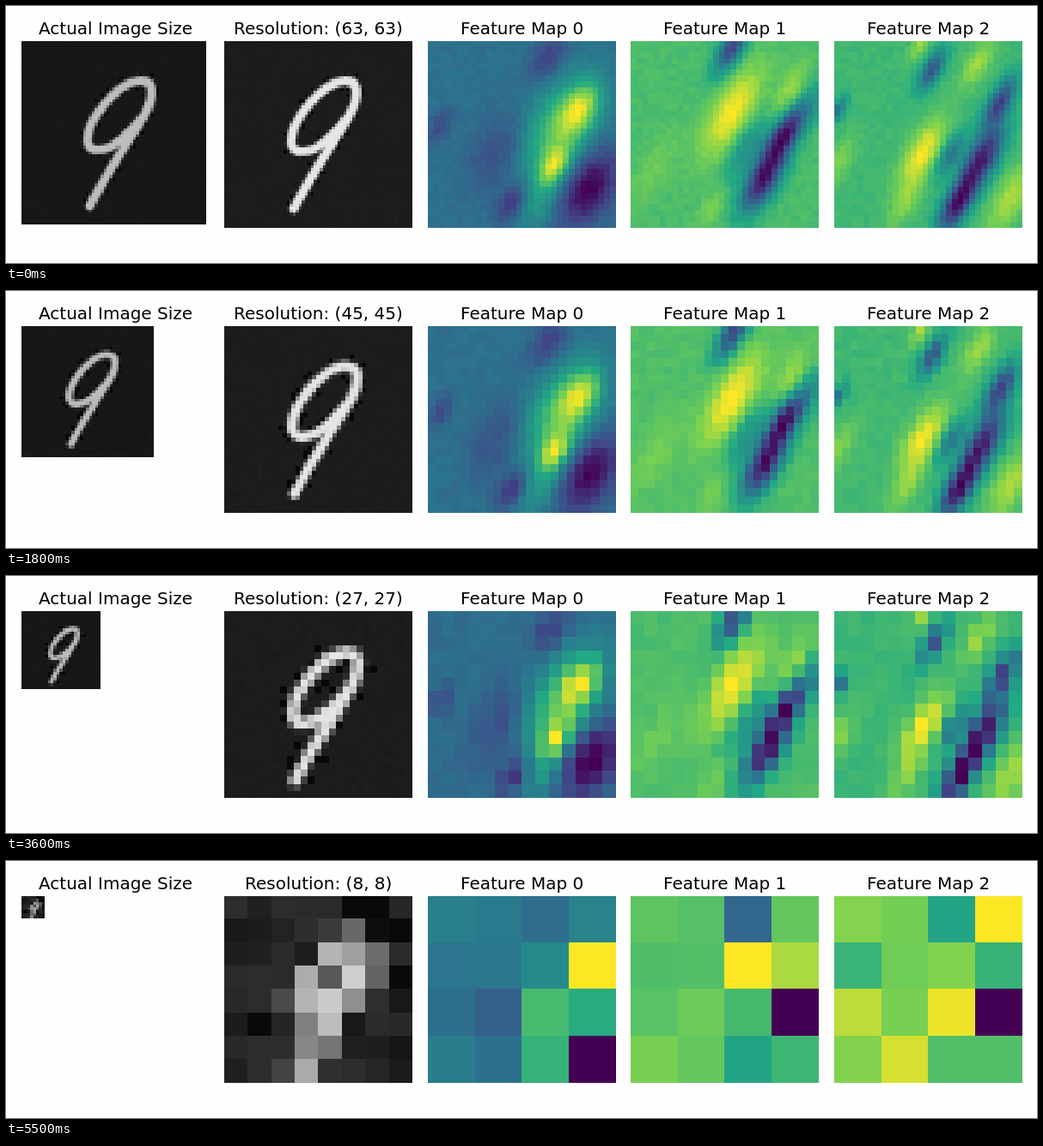
These frames come from a looping animation (1200x300 px, 5.6 s). An HTML page with a canvas:

```html
<!DOCTYPE html>
<html>
<head>
<meta charset="utf-8">
<style>
html, body { margin: 0; width: 100%; height: 100%; overflow: hidden; background: #fefefe; }
canvas { display: block; }
</style>
</head>
<body>
<canvas id="stage" width="1200" height="300"></canvas>
<script>
const SIDE = 219, TOP = 41, FRAME_MS = 100, MAX_N = 63, FRAMES = 56;
const stage = document.getElementById('stage').getContext('2d');
const tile = document.createElement('canvas');
const pen = tile.getContext('2d', { willReadFrequently: true });
const nine = new Path2D('M147 86C158 64 158 46 139 47C112 50 78 95 78 118C78 134 100 136 122 114' +
  'C132 104 142 95 147 86C132 112 105 150 81 197');

const VIRIDIS = ['440154', '414487', '2a788e', '22a884', '7ad151', 'fde725']
  .map(h => [0, 2, 4].map(i => parseInt(h.slice(i, i + 2), 16)));

// All hills lean along the digit's stem; each one is x, y, height, size
const LEAN = -Math.PI / 3;
const MAPS = [
  { base: .33, stretch: 1.3, hills: [
    [177, 80, .4, 17], [152, 105, .38, 34], [147, 147, .45, 13], [130, 190, .15, 18],
    [188, 172, -.4, 25], [97, 190, -.25, 13], [140, 20, -.2, 16], [85, 130, -.14, 28], [14, 100, -.15, 11]] },
  { base: .72, stretch: 1.6, hills: [
    [118, 85, .3, 25], [185, 60, .15, 16], [118, 8, -.48, 15], [178, 110, -.5, 15],
    [155, 162, -.62, 19], [135, 125, -.2, 20], [203, 85, -.2, 18], [95, 195, .1, 13], [28, 150, .07, 22]] },
  { base: .66, stretch: 1.6, hills: [
    [102, 132, .34, 19], [167, 27, .2, 14], [114, 34, -.42, 12], [100, 3, .2, 9],
    [193, 72, -.5, 14], [172, 138, -.6, 19], [143, 192, -.62, 16], [135, 133, -.3, 12],
    [205, 185, .22, 20], [4, 82, -.3, 8], [5, 142, .15, 14], [82, 190, .15, 14]] }
];

const clamp = (v, lo, hi) => Math.min(hi, Math.max(lo, v));
const panelX = k => Math.round(17.8 + 236.5 * k);

function noise(i, j, n) {
  const s = Math.sin(i * 12.9898 + j * 78.233 + n * 37.719) * 43758.5453;
  return s - Math.floor(s);
}

function viridis(v) {
  const last = VIRIDIS.length - 1, p = clamp(v, 0, 1) * last, k = Math.min(last - 1, Math.floor(p));
  return VIRIDIS[k].map((c, i) => c + (VIRIDIS[k + 1][i] - c) * (p - k));
}

// Fill the tile with m x m pixels
function paint(m, colour) {
  tile.width = tile.height = m;
  const img = pen.createImageData(m, m);
  for (let j = 0; j < m; j++)
    for (let i = 0; i < m; i++) img.data.set([...colour(i, j), 255], (j * m + i) * 4);
  pen.putImageData(img, 0, 0);
}

function placeTile(k) {
  stage.save();
  stage.beginPath();
  stage.rect(panelX(k), TOP, SIDE, SIDE - 1);
  stage.clip();
  stage.drawImage(tile, panelX(k) - .1, TOP - .9, SIDE, SIDE - .4);
  stage.restore();
}

function title(text, k) {
  const w = stage.measureText(text).width;
  stage.fillText(text, Math.round(127.4 + 236.5 * k - w / 2), 33);
}

function height({ base, stretch, hills }, x, y) {
  const c = Math.cos(LEAN), s = Math.sin(LEAN);
  return hills.reduce((sum, [hx, hy, h, size]) => {
    const dx = (x - hx) / size, dy = (y - hy) / size;
    const u = (dx * c + dy * s) / stretch, v = (dy * c - dx * s) * stretch;
    return sum + h * Math.exp(-(u * u + v * v) / 2);
  }, base);
}

function drawMap(map, k, n) {
  const m = (n + 1) >> 1, cell = SIDE / m;
  const shift = SIDE / n - SIDE / MAX_N; // coarse pixels drift right and down
  const values = Array.from({ length: m * m }, (_, q) => {
    const i = q % m, j = Math.floor(q / m);
    return height(map, (i + .5) * cell - shift * .5, (j + .5) * cell - shift * .75) + .04 * (noise(i, j, n) - .5);
  });
  const min = Math.min(...values), max = Math.max(...values);
  paint(m, (i, j) => viridis((values[j * m + i] - min) / (max - min)));
  placeTile(k);
}

function strokeNine(width, alpha) {
  pen.lineWidth = width;
  pen.strokeStyle = `rgba(255,255,255,${alpha})`;
  pen.stroke(nine);
}

function drawDigit(n) {
  const px = SIDE / n, drift = .4 * (1 - n / MAX_N), width = 9 + .5 * px;
  const toDigit = () => pen.setTransform(1 / px, 0, 0, 1 / px, drift, drift);
  const back = 28 + 27 * Math.exp(-(((n - 14) / 5) ** 2));
  const grain = 1.5 + 12 * clamp((24 - n) / 8, 0, 1);

  // Dark specks ring the stroke
  tile.width = tile.height = n;
  toDigit();
  pen.lineWidth = width + 3 * px;
  const near = Array.from({ length: n * n }, (_, q) =>
    pen.isPointInStroke(nine, q % n + .5, Math.floor(q / n) + .5));
  paint(n, (i, j) => {
    const r = noise(i, j, n);
    const g = near[j * n + i] && r < .25 ? back * .25 : back + grain * (2 * r - 1);
    return [g, g, g];
  });

  toDigit();
  pen.lineCap = pen.lineJoin = 'round';
  strokeNine(width + .5 * px, .25);
  strokeNine(width - 1, .85);
  placeTile(1);

  const w = Math.round(n * 3.42);
  stage.drawImage(tile, panelX(0), TOP, w, w - 1);
  stage.fillStyle = 'rgba(0,0,0,.18)';
  stage.fillRect(panelX(0), TOP, w, w - 1);
}

function draw(n) {
  stage.fillStyle = '#fefefe';
  stage.fillRect(0, 0, 1200, 300);
  stage.imageSmoothingEnabled = false;
  drawDigit(n);
  MAPS.forEach((map, k) => drawMap(map, k + 2, n));
  stage.fillStyle = '#000';
  stage.font = '20px "DejaVu Sans", sans-serif';
  title('Actual Image Size', 0);
  title(`Resolution: (${n}, ${n})`, 1);
  MAPS.forEach((_, k) => title('Feature Map ' + k, k + 2));
}

let start, shown;
function tick(now) {
  start ??= now;
  const n = MAX_N - Math.floor((now - start) / FRAME_MS) % FRAMES;
  if (n !== shown) draw(shown = n);
  requestAnimationFrame(tick);
}
draw(shown = MAX_N);
requestAnimationFrame(tick);
</script>
</body>
</html>
```
